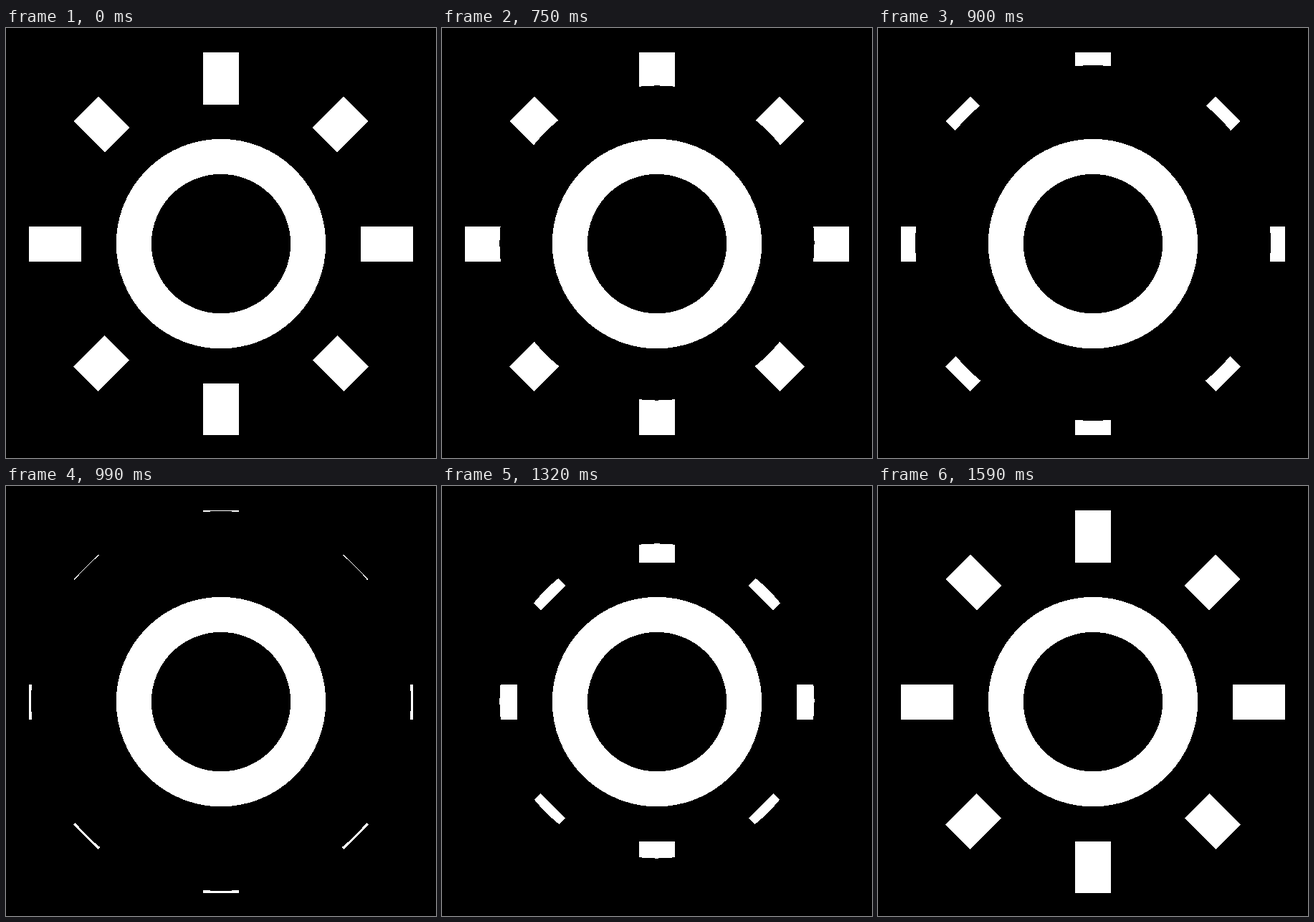
Animation, 600 px wide and 600 px high, one loop 2730 ms. Source, as an HTML page:

```html
<!DOCTYPE html>
<html lang="en">
<head>
<meta charset="utf-8">
<title>Sun</title>
<style>
html, body { margin: 0; height: 100%; overflow: hidden; background: #000; }
svg { display: block; width: 100%; height: 100%; }
</style>
</head>
<body>
<svg viewBox="0 0 600 600" shape-rendering="crispEdges" fill="#fff">
  <rect x="275" y="34" width="50" height="73" rx="1.5"/>
  <rect x="275" y="496" width="50" height="72"/>
  <rect x="32" y="277" width="73" height="49"/>
  <rect x="495" y="277" width="73" height="49"/>
  <g transform="translate(300 301.2)">
    <rect id="ray" x="205" y="-24.3" width="61.6" height="48.6" transform="rotate(45)"/>
    <use href="#ray" transform="rotate(90)"/>
    <use href="#ray" transform="rotate(180)"/>
    <use href="#ray" transform="rotate(270)"/>
  </g>
  <circle id="shutter" cx="300" cy="300" fill="none" stroke="#000"/>
  <circle cx="300" cy="301.1" r="121.7" fill="none" stroke="#fff" stroke-width="49"/>
</svg>
<script>
const LOOP = 2730, STEP = 30, SWITCH = 1200, SPEED = 0.189;
const shutter = document.getElementById('shutter');

// Black band between two radii
function cover(inner, outer) {
  shutter.setAttribute('r', (inner + outer) / 2);
  shutter.setAttribute('stroke-width', outer - inner);
}

function draw(now) {
  const t = Math.floor(now % LOOP / STEP) * STEP;
  const radius = start => 196.9 + (t - start) * SPEED;
  // A growing disc hides the rays, then a second one uncovers them
  if (t < SWITCH) cover(0, radius(630));
  else cover(radius(SWITCH), radius(SWITCH) + 200);
}

let start;
function tick(now) {
  start ??= now;
  draw(now - start);
  requestAnimationFrame(tick);
}
draw(0);
requestAnimationFrame(tick);
</script>
</body>
</html>
```
